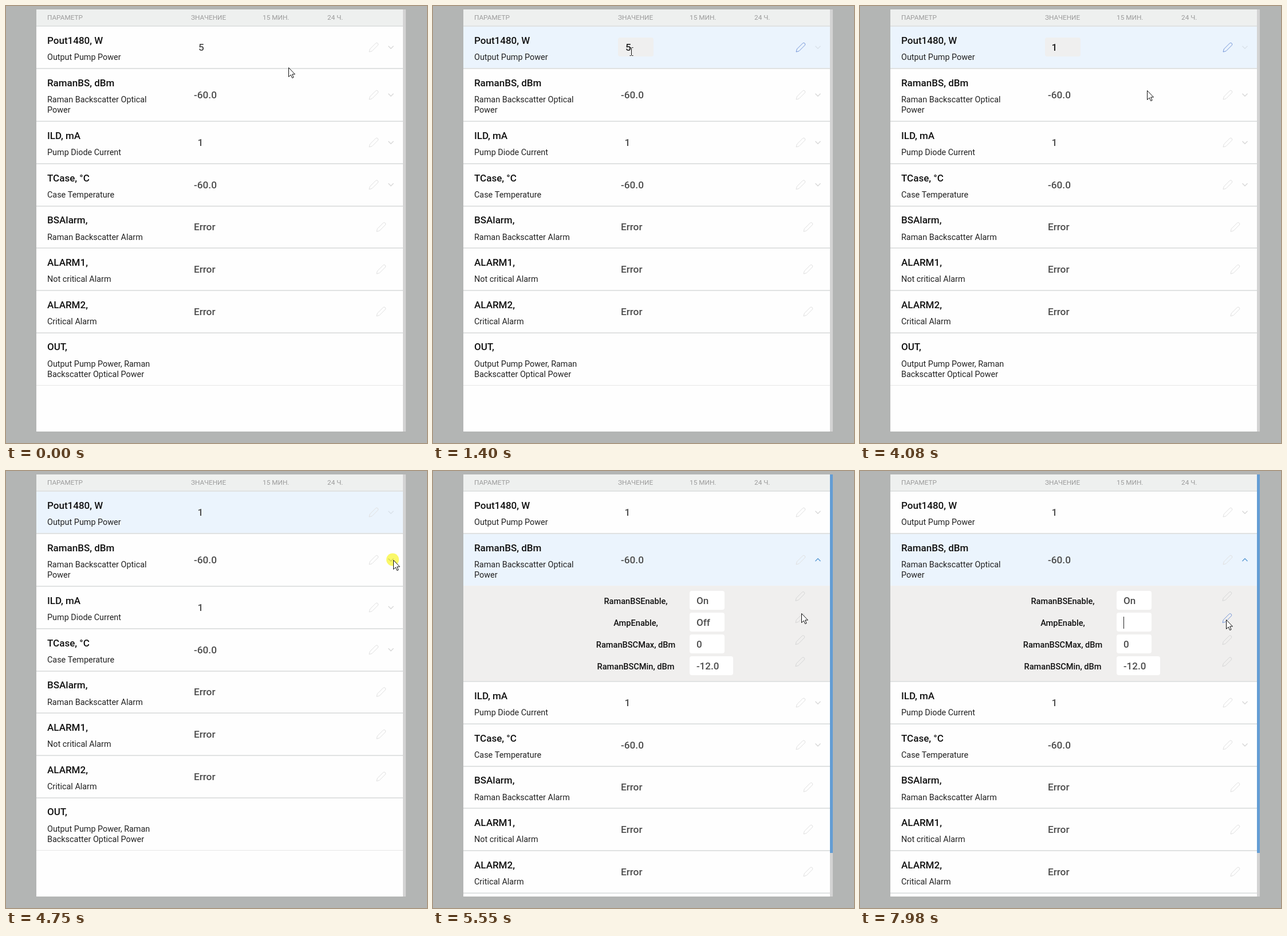
An HTML page with a canvas that plays this animation: 735 by 762 pixels, repeating every 8000 ms.

```html
<!DOCTYPE html>
<html lang="ru">
<head>
<meta charset="utf-8">
<title>Параметры</title>
<style>
  html, body { margin: 0; width: 100%; height: 100%; overflow: hidden; background: #b3b5b4; }
  canvas { display: block; }
</style>
</head>
<body>
<canvas id="stage" width="735" height="762"></canvas>
<script>
const ctx = document.getElementById('stage').getContext('2d');
const LOOP = 8000, LEFT = 53, RIGHT = 693, TOP = 6, BOTTOM = 742;
const ROW = 73.7, TALL_ROW = 92.2, SUB_HEIGHT = 166;
const GREY = '#e0e0e0', BLUE = '#7596d8', LINE = '#e0e2e2', VALUE = '#4c4c4c';
const OPEN_AT = 4850;

const rows = [
  ['Pout1480, W', ['Output Pump Power'], '5', true],
  ['RamanBS, dBm', ['Raman Backscatter Optical', 'Power'], '-60.0', true],
  ['ILD, mA', ['Pump Diode Current'], '1', true],
  ['TCase, °C', ['Case Temperature'], '-60.0', true],
  ['BSAlarm,', ['Raman Backscatter Alarm'], 'Error'],
  ['ALARM1,', ['Not critical Alarm'], 'Error'],
  ['ALARM2,', ['Critical Alarm'], 'Error'],
  ['OUT,', ['Output Pump Power, Raman', 'Backscatter Optical Power'], ''],
];
const settings = [
  ['RamanBSEnable,', 'On'], ['AmpEnable,', 'Off'],
  ['RamanBSCMax, dBm', '0'], ['RamanBSCMin, dBm', '-12.0'],
];

// Typing steps: time, text, caret x
const powerEdit = {
  from: 870, to: 4500,
  steps: [[0, '5', 346], [2330, '', 336], [3140, '1', 343]],
  caret: [[870, 1400], [1930, 2460], [2960, 3670], [4200, 4500]],
};
const ampEdit = {
  from: 5890, to: LOOP,
  steps: [[0, 'Off', 483], [7270, 'Of', 478], [7470, 'O', 472], [7730, '', 460]],
  caret: [[5890, 6420], [6930, 7470], [7980, LOOP]],
};

// Pointer: time, x, y
const route = [
  [0, 493, 107], [280, 493, 107], [720, 346, 78], [3670, 346, 78], [3830, 321, 84],
  [4110, 522, 154], [4420, 676, 155], [5310, 676, 155], [5580, 639, 259], [LOOP, 639, 259],
];
// Clicks: start, end, x, y
const clicks = [[760, 940, 344, 77], [4500, 4850, 675, 154.5], [5730, 5900, 639.5, 258]];

const within = (t, from, to) => t >= from && t < to;
const editing = (edit, t) => within(t, edit.from, edit.to);
const currentStep = (edit, t) => edit.steps.filter(s => s[0] <= t).pop();

function rect(x, y, w, h, color) {
  ctx.fillStyle = color;
  ctx.fillRect(x, y, w, h);
}

function box(x, y, w, h, color) {
  ctx.fillStyle = color;
  ctx.beginPath();
  ctx.roundRect(x, y, w, h, 4);
  ctx.fill();
}

function text(str, x, y, size, color, weight = 400, align = 'left') {
  ctx.font = `${weight} ${size}px Roboto, sans-serif`;
  ctx.textAlign = align;
  ctx.fillStyle = color;
  ctx.fillText(str, x, y);
}

function shape(x, y, d, stroke, width = 1, fill) {
  const path = new Path2D(d);
  ctx.save();
  ctx.translate(x, y);
  if (fill) { ctx.fillStyle = fill; ctx.fill(path); }
  ctx.strokeStyle = stroke;
  ctx.lineWidth = width;
  ctx.stroke(path);
  ctx.restore();
}

const pencil = (x, y, color) => shape(x, y,
  'M-8 8L-6.6 3L3.6-7.2Q5.3-8.6 7-7Q8.6-5.3 7.2-3.6L-3-6.6L-3 6.6Z'.replace('L-3-6.6', ''), color);
const chevron = (x, y, color, up) => shape(x, y,
  up ? 'M-4.5 2.3L0-2.2L4.5 2.3' : 'M-4.5-2.3L0 2.2L4.5-2.3', color, 1.4);

function drawCaret(edit, t, y) {
  if (edit.caret.some(([from, to]) => within(t, from, to)))
    rect(currentStep(edit, t)[2], y, 1, 21, '#222');
}

function drawSettings(y, t) {
  rect(LEFT, y - 1, RIGHT - LEFT, SUB_HEIGHT, '#f0efee');
  settings.forEach(([label, value], i) => {
    const top = y + 8 + i * 38.1;
    const active = i === 1 && editing(ampEdit, t);
    text(label, 354, top + 23, 14.6, '#111', 500, 'center');
    box(448, Math.round(top), i === 3 ? 76 : 61, 33, '#fff');
    text(active ? currentStep(ampEdit, t)[1] : value, 460, top + 22.5, 17, VALUE, 500);
    pencil(641, top + 9.3, active ? BLUE : '#d6d6d6');
  });
  drawCaret(ampEdit, t, 254);
}

function drawRow([title, notes, value, expandable], i, y, h, t, open) {
  const middle = y + h / 2;
  const active = i === 0 && editing(powerEdit, t);
  const lit = open ? i === 1 : i === 0 && t >= 940;
  if (lit) rect(LEFT, Math.round(y) + 1, RIGHT - LEFT, Math.round(h) - 2, '#ebf4fd');
  text(title, 72, y + 30.8, 17, '#111', 500);
  notes.forEach((note, n) => text(note, 72, y + 59 + n * 18.4, 14.4, '#222'));

  if (active) box(323, 55, 62, 33, '#efefef');
  const shown = i === 0 ? currentStep(powerEdit, t)[1] : value;
  const x = shown === '5' ? 336 : shown === '1' ? 334.5 : 328;
  text(shown, x, middle + 6, 17.3, active ? '#222' : VALUE, 500);
  if (active) drawCaret(powerEdit, t, 62);

  if (value) pencil(expandable ? 642 : 655, middle, active ? BLUE : GREY);
  if (expandable) {
    const up = open && i === 1;
    chevron(672, middle, up ? '#5b9bd5' : lit ? '#dae2ea' : '#d8d8d8', up);
  }
}

function drawTable(t) {
  const open = t >= OPEN_AT;
  ctx.save();
  ctx.beginPath();
  ctx.rect(LEFT, TOP, 645, BOTTOM - TOP);
  ctx.clip();
  rect(LEFT, TOP, RIGHT - LEFT, BOTTOM - TOP, '#fefefe');
  rect(LEFT, TOP, RIGHT - LEFT, 29, '#eef0ef');
  [['ПАРАМЕТР', 72], ['ЗНАЧЕНИЕ', 323], ['15 МИН.', 448], ['24 Ч.', 561]]
    .forEach(([label, x]) => text(label, x, 24, 11.8, '#9b9b9b'));

  let y = 35.2;
  rect(LEFT, 34, RIGHT - LEFT, 2, LINE);
  rows.forEach((row, i) => {
    const h = row[1].length > 1 ? TALL_ROW : ROW;
    drawRow(row, i, y, h, t, open);
    y += h;
    if (open && i === 1) {
      drawSettings(y, t);
      y += SUB_HEIGHT;
    }
    const last = i === rows.length - 1;
    rect(LEFT, Math.round(y) - 1, RIGHT - LEFT, last ? 1 : 2, last ? '#e6e6e6' : LINE);
  });

  rect(RIGHT, TOP, 5, BOTTOM - TOP, '#d3d3d3');
  if (open) rect(RIGHT, TOP, 5, 660, '#649dd4');
  ctx.restore();
}

function drawPointer(t) {
  ctx.globalCompositeOperation = 'multiply';
  for (const [from, to, x, y] of clicks) {
    if (!within(t, from, to)) continue;
    ctx.fillStyle = '#fbf968';
    ctx.beginPath();
    ctx.arc(x, y, 11, 0, 7);
    ctx.fill();
  }
  ctx.globalCompositeOperation = 'source-over';

  const next = route.findIndex(p => p[0] > t);
  const [t0, x0, y0] = route[next - 1], [t1, x1, y1] = route[next];
  const k = (t - t0) / (t1 - t0);
  const x = Math.round(x0 + (x1 - x0) * k), y = Math.round(y0 + (y1 - y0) * k);
  const overField = within(x, 323, 385) && within(y, 55, 90);
  if (overField)
    shape(x + .5, y + .5, 'M-3-6H-1L0-5L1-6H3M0-5V7M-3 8H-1L0 7L1 8H3', '#111');
  else
    shape(x + .5, y + .5, 'M0 0V16L3.7 12.5L6.2 18L8.6 17L6.2 11.5H11Z', '#111', 1, '#fff');
}

function frame(now) {
  const t = now % LOOP;
  rect(0, 0, 735, 762, '#b3b5b4');
  drawTable(t);
  drawPointer(t);
  requestAnimationFrame(frame);
}
requestAnimationFrame(frame);
</script>
</body>
</html>
```
